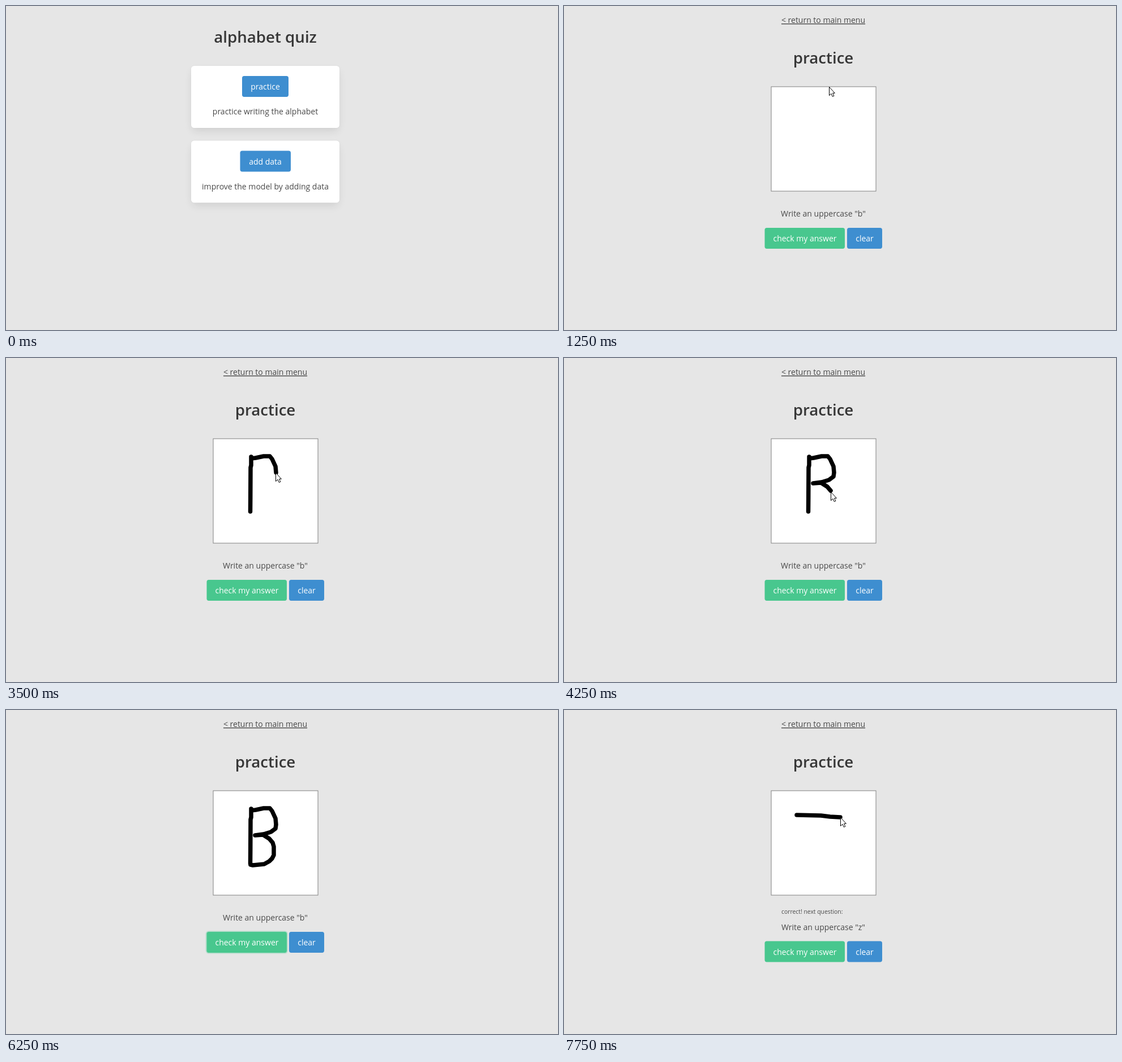
Animation of 975 by 574 pixels, one loop 8000 ms. Source, as an HTML page:

```html
<!DOCTYPE html>
<html lang="en">
<head>
<meta charset="utf-8">
<title>alphabet quiz</title>
<style>
  html, body { margin: 0; width: 100%; height: 100%; overflow: hidden; background: #e6e6e6; }
  svg { display: block; }
  text { font: 14px "Open Sans", "Noto Sans", sans-serif; fill: #4a4a4a; text-anchor: middle; }
  .title { font-size: 27.7px; font-weight: 600; fill: #363636; }
  .small { font-size: 10.4px; text-anchor: start; }
  .link { text-decoration: underline; }
  .shadow { fill: #0a0a0a; opacity: .1; filter: blur(7.3px); }
  .card { fill: #fff; stroke: rgba(10, 10, 10, .02); stroke-width: 2; paint-order: stroke; }
  .button text { fill: #fff; }
  .button rect { fill: #3e8ed0; stroke-width: 3.7; paint-order: stroke; }
  .button.hover rect { fill: #3488ce; }
  .button.focus rect { stroke: rgba(62, 142, 208, .25); }
  .button.green rect { fill: #48c78e; }
  .button.green.hover rect { fill: #3ec487; }
  .button.green.focus rect { stroke: rgba(72, 199, 142, .3); }
  #ink { fill: none; stroke: #000; stroke-width: 7.5; stroke-linecap: round; stroke-linejoin: round; }
</style>
</head>
<body>
<svg width="975" height="574" viewBox="0 0 975 574">
  <g id="menu">
    <text class="title" x="458" y="64.5">alphabet quiz</text>
    <rect class="shadow" x="329" y="115" width="258" height="106" rx="5"/>
    <rect class="card" x="327" y="106" width="262" height="110" rx="5.5"/>
    <g class="button" id="start">
      <rect x="417" y="124" width="82" height="37" rx="3.7"/>
      <text x="458" y="148">practice</text>
    </g>
    <text x="458" y="192">practice writing the alphabet</text>
    <rect class="shadow" x="329" y="247.5" width="258" height="106" rx="5"/>
    <rect class="card" x="327" y="238.5" width="262" height="110" rx="5.5"/>
    <g class="button">
      <rect x="413.5" y="256.5" width="89.5" height="37" rx="3.7"/>
      <text x="458" y="280.5">add data</text>
    </g>
    <text x="458" y="325">improve the model by adding data</text>
  </g>
  <g id="quiz">
    <text class="link" x="458" y="30">&lt; return to main menu</text>
    <text class="title" x="458" y="101.5">practice</text>
    <rect x="366" y="143" width="185" height="185" fill="#fff" stroke="#808080"/>
    <path id="ink"/>
    <text class="small" id="result" x="384" y="361">correct! next question:</text>
    <g id="lower">
      <text id="question" x="458" y="373"></text>
      <g class="button green" id="check">
        <rect x="354.5" y="393" width="141.5" height="37" rx="3.7"/>
        <text x="425.5" y="417">check my answer</text>
      </g>
      <g class="button">
        <rect x="500" y="393" width="62" height="37" rx="3.7"/>
        <text x="531" y="417">clear</text>
      </g>
    </g>
  </g>
  <path id="cursor" d="M.5 .5V15.5L4 12.3L6.3 17.5L8.8 16.4L6.6 11.3H10.4Z" fill="#fff" stroke="#000"/>
</svg>
<script>
const LOOP = 8000, STEP = 250;
const OPEN_QUIZ = 5, NEXT_QUESTION = 26;
const $ = id => document.getElementById(id);

// Cursor tip at each step; null while it is hidden
const cursorPath = [
  null, [446, 416], [458, 362], [468, 146], [468, 143],
  [468, 143], [446, 163], [433, 175], [433, 191], [431, 250], [430, 272],
  [432, 225], [433, 178], [466, 174], [476, 203], [455, 220],
  [440, 222], [471, 237], [470, 263], [432, 274], [423, 350],
  [439, 371], [432, 408], [432, 412], [436, 419],
  null, null, null, [420, 178], [411, 186], [454, 187], [488, 190]
];

// Pen strokes: the step at which each piece appears
const letterB = [
  [7, 'M433 175h.01'], [8, 'V190'], [9, 'L432 194L431.7 250'], [10, 'L431.5 272'],
  [12, 'M433 178h.01'], [13, 'L441 177L455 174L466 174'],
  [14, 'L470 179L476 192L477 203'], [15, 'L476 210L468 216L455 220'],
  [16, 'L440 222'], [17, 'L454 221L465 228L471 235'],
  [18, 'L473 242V257L470 263'], [19, 'L465 268L456 273L436 275L432 274']
];
const letterZ = [[29, 'M411 186h.01'], [30, 'L454 187'], [31, 'L470 189L488 190']];

const show = (id, on) => { $(id).style.display = on ? '' : 'none'; };
const between = (n, from, to) => n >= from && n < to;

function draw(step) {
  const next = step >= NEXT_QUESTION;
  show('menu', step < OPEN_QUIZ);
  show('quiz', step >= OPEN_QUIZ);
  $('start').classList.toggle('hover', between(step, 3, 5));
  $('start').classList.toggle('focus', step === 4);
  $('check').classList.toggle('hover', between(step, 22, 25));
  $('check').classList.toggle('focus', between(step, 23, 29));

  show('result', next);
  $('question').textContent = `Write an uppercase "${next ? 'z' : 'b'}"`;
  $('lower').setAttribute('transform', `translate(0 ${next ? 16.5 : 0})`);
  $('ink').setAttribute('d', (next ? letterZ : letterB)
    .filter(([at]) => at <= step).map(([, piece]) => piece).join(''));

  const tip = cursorPath[step];
  show('cursor', tip);
  if (tip) $('cursor').setAttribute('transform', `translate(${tip})`);
}

function tick() {
  draw(Math.floor(performance.now() % LOOP / STEP));
  requestAnimationFrame(tick);
}
tick();
</script>
</body>
</html>
```
